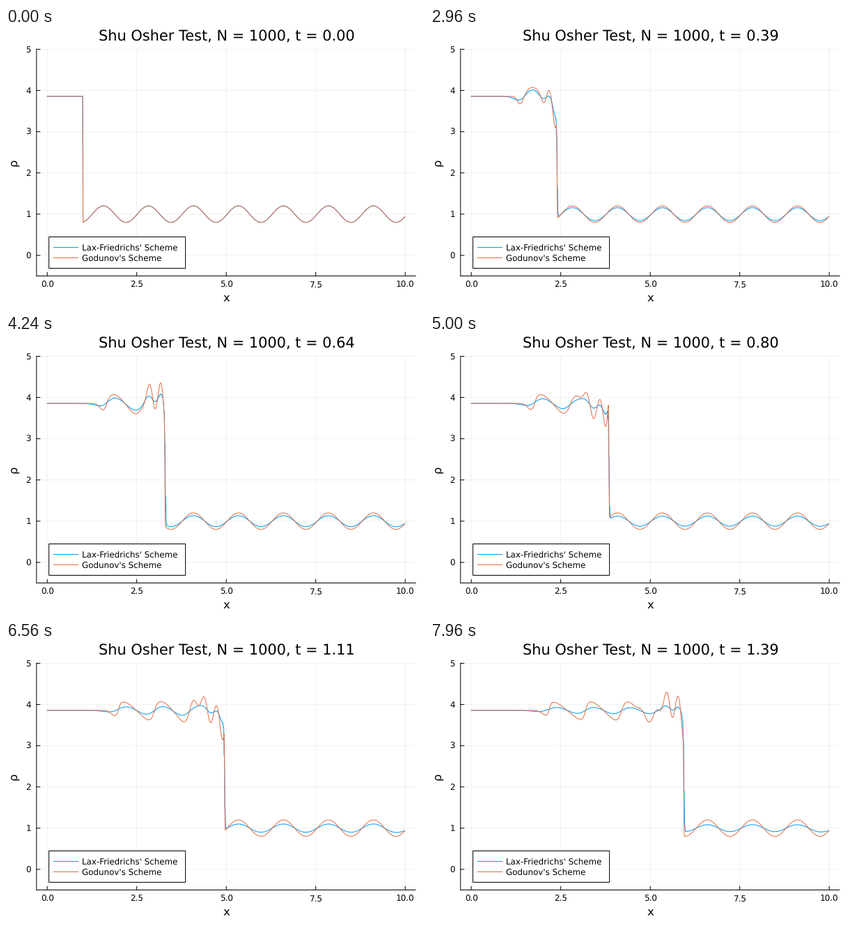
A matplotlib script that plays this animation: 600x400 px, repeating every 8 s.

```python
import numpy as np
import matplotlib.pyplot as plt
from matplotlib.animation import FuncAnimation
from matplotlib.patches import Rectangle

plt.rcParams.update({"font.family": "DejaVu Sans", "text.hinting": "none",
                     "path.simplify": False, "path.snap": False})

W, H, DPI = 600, 400, 100
PX = 72 / DPI                      # points per pixel
FRAMES, HOLD, INTERVAL = 200, 25, 40
BLUE, ORANGE = "#009afa", "#e26f46"

# Shu-Osher problem on [0, 10)
GAMMA = 1.4
N, DX, DT, STEPS = 1000, 0.01, 0.002, 4
G1, G2 = GAMMA - 1, GAMMA + 1
x = np.arange(N) * DX


def initial_state():
    left = x < 1 - 1e-9
    rho = np.where(left, 3.857143, 1 + 0.2 * np.sin(5 * x))
    u = np.where(left, 2.629369, 0.0)
    p = np.where(left, 10.33333, 1.0)
    return np.array([rho, rho * u, p / G1 + rho * u**2 / 2])


def primitive(U):
    rho, m, E = U
    u = m / rho
    return rho, u, G1 * (E - rho * u**2 / 2)


def flux(rho, u, p):
    E = p / G1 + rho * u**2 / 2
    return np.array([rho * u, rho * u**2 + p, u * (E + p)])


# Both schemes keep the two end cells fixed
def lax_friedrichs(U):
    F = flux(*primitive(U))
    new = U.copy()
    new[:, 1:-1] = ((U[:, 2:] + U[:, :-2]) / 2
                    - DT / (2 * DX) * (F[:, 2:] - F[:, :-2]))
    return new


def godunov(U):
    F = flux(*riemann(*primitive(U)))
    new = U.copy()
    new[:, 1:-1] -= DT / DX * (F[:, 1:] - F[:, :-1])
    return new


def pressure_function(p, rho, pk, c):
    """Velocity jump across a shock or rarefaction, and its slope in p."""
    a, b = 2 / (G2 * rho), G1 / G2 * pk
    root = np.sqrt(a / (p + b))
    ratio = p / pk
    power = ratio ** (G1 / (2 * GAMMA))
    shock = p > pk
    f = np.where(shock, (p - pk) * root, 2 * c / G1 * (power - 1))
    df = np.where(shock, root * (1 - (p - pk) / (2 * (p + b))),
                  power / ratio / (rho * c))
    return f, df


def riemann(rho, u, p):
    """Exact Riemann solution on each cell face."""
    c = np.sqrt(GAMMA * p / rho)
    sides = np.array([[q[:-1], q[1:]] for q in (rho, u, p, c)])
    r2, u2, p2, c2 = sides
    ps = p2.mean(axis=0)
    for _ in range(7):
        f, df = pressure_function(ps, r2, p2, c2)
        ps = np.maximum(ps - (f.sum(0) + u2[1] - u2[0]) / df.sum(0), 1e-6)
    f, _ = pressure_function(ps, r2, p2, c2)
    us = (u2[0] + u2[1] + f[1] - f[0]) / 2

    # Mirror right-hand waves so that only left-hand ones need sampling
    rightward = us >= 0
    sign = np.where(rightward, 1, -1)
    rk, uk, pk, ck = np.where(rightward, sides[:, 0], sides[:, 1])
    uk, us = sign * uk, sign * us
    ratio, g = ps / pk, G1 / G2
    shock = ratio > 1
    rs = rk * np.where(shock, (ratio + g) / (g * ratio + 1), ratio ** (1 / GAMMA))
    speed = uk - ck * np.sqrt(G2 / (2 * GAMMA) * ratio + G1 / (2 * GAMMA))
    head, tail = uk - ck, us - np.sqrt(GAMMA * ps / rs)
    cf = np.maximum(2 / G2 * (ck + G1 / 2 * uk), 1e-6)
    fan = (rk * (cf / ck) ** (2 / G1), cf, pk * (cf / ck) ** (2 * GAMMA / G1))
    outside = np.where(shock, speed > 0, head > 0)
    inside = shock | (tail < 0)
    r, v, q = (np.where(outside, k, np.where(inside, s, m))
               for k, s, m in zip((rk, uk, pk), (rs, us, ps), fan))
    return r, sign * v, q


def densities(step):
    U = initial_state()
    history = [U[0]]
    for _ in range(FRAMES - HOLD - 1):
        for _ in range(STEPS):
            U = step(U)
        history.append(U[0])
    return history


lax_history = densities(lax_friedrichs)
god_history = densities(godunov)

# Stage in pixel coordinates, y pointing down
fig = plt.figure(figsize=(W / DPI, H / DPI), dpi=DPI, facecolor="white")
ax = fig.add_axes([0, 0, 1, 1])
ax.set(xlim=(0, W), ylim=(H, 0))
ax.axis("off")

LEFT, RIGHT, TOP, BOTTOM = 43.8, 588, 30.5, 355.5
SPAN = x[-1]
MARGIN = 0.03 * SPAN


def sx(v):
    return LEFT + (v + MARGIN) * (RIGHT - LEFT) / (SPAN + 2 * MARGIN)


def sy(v):
    return BOTTOM - (v + 0.5) * (BOTTOM - TOP) / 5.5


def line(xs, ys, color="black", width=1.0, **kw):
    return ax.plot(xs, ys, color=color, lw=width * PX, **kw)[0]


def label(px, py, s, size, ha="center", **kw):
    return ax.text(px, py, s, fontsize=size * PX, ha=ha,
                   va=kw.pop("va", "baseline"), **kw)


SMALL, MEDIUM, LARGE = 11.9, 16.3, 20.85

for v in (0, 2.5, 5, 7.5, 10):
    line([sx(v)] * 2, [TOP, BOTTOM], alpha=0.055, zorder=1)
    line([sx(v)] * 2, [BOTTOM, BOTTOM - 5], zorder=2)
    label(sx(v), 372, f"{v:.1f}", SMALL)
for v in range(6):
    line([LEFT, RIGHT], [sy(v)] * 2, alpha=0.055, zorder=1)
    line([LEFT, LEFT + 5], [sy(v)] * 2, zorder=2)
    label(36, sy(v) + 4.4, str(v), SMALL, ha="right")
line([LEFT, LEFT], [TOP, BOTTOM], zorder=2)
line([LEFT, RIGHT], [BOTTOM, BOTTOM], zorder=2)

label(316, 392, "x", MEDIUM)
label(12, 193, "ρ", MEDIUM, va="center", rotation=90)
title = label(132.7, 19, "", LARGE, ha="left")

lax_line = line([], [], BLUE, zorder=3)
god_line = line([], [], ORANGE, zorder=4)

ax.add_patch(Rectangle((61.6, 299.5), 196, 45, fc="white", ec="black",
                       lw=PX, zorder=5))
for py, color, name in ((314.5, BLUE, "Lax-Friedrichs' Scheme"),
                        (329.5, ORANGE, "Godunov's Scheme")):
    line([68, 104], [py, py], color, zorder=6, solid_capstyle="butt")
    label(109, py + 4.4, name, SMALL, ha="left", zorder=6)


def update(frame):
    i = max(0, frame - HOLD)
    lax_line.set_data(sx(x), sy(lax_history[i]))
    god_line.set_data(sx(x), sy(god_history[i]))
    hundredths = i * 8 // 10       # time is cut, not rounded
    title.set_text(f"Shu Osher Test, N = 1000, t = {hundredths / 100:.2f}")
    return lax_line, god_line, title


anim = FuncAnimation(fig, update, frames=FRAMES, interval=INTERVAL,
                     repeat=True, repeat_delay=0, blit=False)
plt.show()
```
